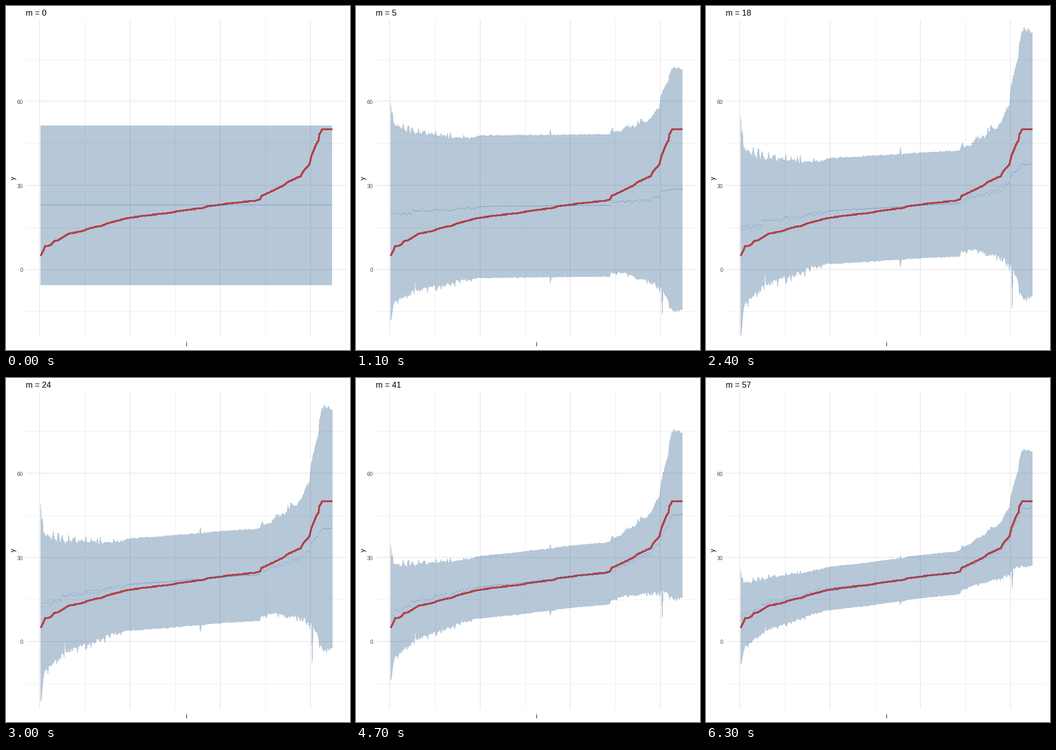
These frames come from a looping animation (748 by 748 pixels, 6.9 s). A matplotlib script:

```python
import numpy as np
import matplotlib.pyplot as plt
from matplotlib.animation import FuncAnimation
from matplotlib.patches import Polygon

SIZE, DPI = 748, 100
PT = 72 / DPI                     # points per pixel
N, FRAMES, LAST = 324, 69, 57
X0, DX = 73.5, 1.9615             # pixel of i = 0, pixels per i
Y0, DY = 573, 6.092               # pixel of y = 0, pixels per unit
START, WIDTH = 22.9, 28.4         # mean and half width before fitting

plt.rcParams["font.family"] = "Liberation Sans"


def ypx(value):
    return Y0 - DY * value


# Sorted outcome: knots (i, y), rounded to small stairs.
KNOTS = [(1, 5), (4, 6.8), (6, 8.3), (12, 8.7), (16, 10.2), (20, 10.4),
         (26, 11.7), (32, 12.8), (46, 13.6), (57, 14.9), (69, 15.6),
         (75, 16.5), (92, 17.9), (98, 18.4), (116, 19.2), (141, 20.1),
         (163, 21.3), (182, 22), (185, 22.5), (210, 23.6), (238, 24.5),
         (244, 25), (246, 26.3), (257, 27.9), (270, 30), (276, 31.4),
         (289, 33.3), (292, 35), (299, 37.6), (301, 40.3), (305, 43.7),
         (309, 46.1), (310, 48.3), (313, 50), (324, 50)]
cases = np.arange(1, N + 1)
xs = X0 + DX * cases
y = np.round(np.interp(cases, *zip(*KNOTS)) * 5) / 5

# Early on, cases in one block of y share a fit; each block has its roughness.
block = np.searchsorted([11, 16, 18.2, 25.5, 34, 38], y)
block_fit = np.array([np.median(y[block == b]) for b in range(7)])[block]
rough = np.array([0.06, 0.05, 0.04, 0.008, 0.045, 0.05, 0.018])[block]

# Log of the width that the outer cases gain over the middle ones.
gain = (0.042 * np.maximum(17 - y, 0) + 0.045 * np.maximum(y - 28, 0)
        + 0.2 * np.exp(-(cases - 1) / 3))

# Each case keeps its own deviation for the whole run.
rng = np.random.default_rng(4)


def jags():
    return rough * (rng.exponential(1, N).clip(0, 3) - 0.8)


jag_top, jag_bottom = jags(), jags()
jag_mean = 10 * rough * rng.normal(0, 1, N).clip(-2, 2)

# Outliers: case, extra relative width above and below.
for i, above, below in [(28, -0.05, -0.25), (178, 0.15, 0.15), (302, 0, 0.5)]:
    jag_top[i - 1] += above
    jag_bottom[i - 1] += below


def fit(m):
    """Mean, top and bottom of the band after m iterations."""
    grown = 1 - np.exp(-m / 6.5)
    shared = np.exp(-m / 12)
    left = np.exp(-0.041 * m - 0.04 * (1 - np.exp(-m / 3)))
    goal = shared * block_fit + (1 - shared) * np.maximum(y, 6.5)
    mean = goal + (START - goal) * left
    half = WIDTH * np.exp(-0.0231 * m + grown * gain)
    return (mean + grown * jag_mean,
            mean + half * (1 + grown * jag_top),
            mean - half * (1 + grown * jag_bottom))


fig = plt.figure(figsize=(SIZE / DPI, SIZE / DPI), dpi=DPI, facecolor="white")
ax = fig.add_axes([0, 0, 1, 1])
ax.set(xlim=(0, SIZE), ylim=(SIZE, 0))
ax.axis("off")


def grid(width, columns, values):
    style = dict(color="#ebebeb", lw=width * PT, solid_capstyle="butt", zorder=1)
    for i in columns:
        ax.plot([X0 + DX * i] * 2, [29, 720], **style)
    for v in values:
        ax.plot([44, 741], [ypx(v)] * 2, **style)


def label(x, y, text, px, **kw):
    return ax.text(x, y, text, fontsize=px * PT, **kw)


grid(1, (50, 150, 250), (-15, 15, 45, 75))
grid(2, (0, 100, 200, 300), (0, 30, 60))

band = ax.add_patch(Polygon([(0, 0), (1, 0), (1, 1)], facecolor="#0f4880", alpha=0.3,
                            lw=0, antialiased=False, zorder=2))
ax.plot(xs, ypx(y), color="#b0434b", lw=3.2 * PT, solid_joinstyle="round",
        solid_capstyle="butt", antialiased=False, zorder=3)
dots, = ax.plot([], [], ls="", marker=",", color="#1a6a9c", zorder=4)

title = label(43.5, 21, "", 17.9, va="baseline")
for v in (0, 30, 60):
    label(37, ypx(v) + 5.5, str(v), 11.7, color="#4d4d4d", ha="right", va="baseline")
label(392.3, 740, "i", 14.7, color="#12264d", ha="center", va="baseline")
label(16, 374.5, "y", 14.7, ha="center", va="center", rotation=90)


def iteration(t):
    """Half steps up to 5, then whole steps, then a hold."""
    if t <= 11:
        return max(t - 1, 0) / 2
    return min(t - 6, LAST)


def draw(t):
    m = iteration(t)
    mean, top, bottom = fit(m)
    edge = ypx(np.r_[top, bottom[::-1]])
    band.set_xy(np.column_stack([np.r_[xs, xs[::-1]], edge]))
    dots.set_data(xs, ypx(mean))
    title.set_text(f"m = {int(m)}")
    return band, dots, title


anim = FuncAnimation(fig, draw, frames=FRAMES, interval=100, repeat=True)
plt.show()
```
